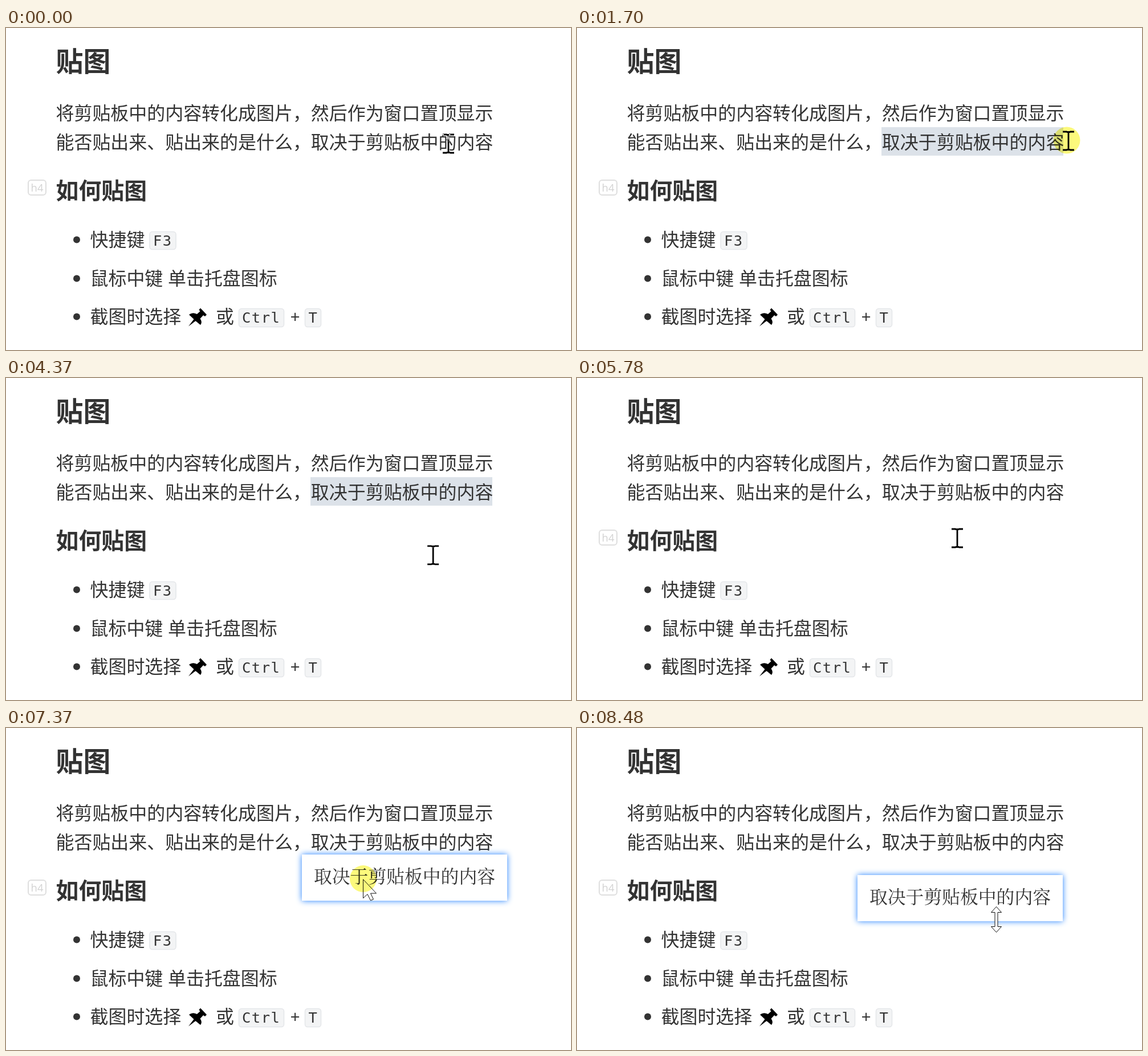
An HTML page for the animation above (8.55 s loop, 991 px wide and 565 px high).

```html
<!DOCTYPE html>
<html lang="zh-CN">
<head>
<meta charset="utf-8">
<style>
html, body { margin: 0; width: 100%; height: 100%; overflow: hidden; background: #fff; }
svg { display: block; width: 991px; height: 565px; }
text { font-family: "Noto Sans CJK SC", "Noto Sans CJK", sans-serif; font-size: 31.96px; fill: #333; white-space: pre; }
.code { font-family: "DejaVu Sans Mono", monospace; font-size: 25.5px; letter-spacing: 1.5px; }
.key { fill: #f3f4f5; stroke: #e4e6e9; stroke-width: 1.5; }
.menu text { font-size: 24px; }
.menu .latin { font-family: "Open Sans", sans-serif; }
.menu .btn { fill: #fbfbfb; stroke: #e3e4e6; stroke-width: 1.5; }
.menu .slab { font-family: "Liberation Mono", monospace; font-size: 27px; text-anchor: middle; }
.panel { fill: #fff; filter: drop-shadow(0 3px 15px rgba(0,0,0,.2)); }
.glow { fill: #fff; filter: drop-shadow(0 0 5.5px #2080ff); }
.note { font-family: "Noto Serif CJK SC", "Noto Serif CJK", "Noto Sans CJK SC", serif; font-weight: 300; font-size: 31.8px; }
.press { fill: #fcf97c; mix-blend-mode: multiply; }
.beam { fill: none; stroke: #fff; stroke-width: 2.8; mix-blend-mode: difference; }
.pointer { fill: #fff; stroke: #111; stroke-width: 1; }
</style>
</head>
<body>
<svg viewBox="0 0 991 565">
  <rect width="991" height="565" fill="#fff"/>
  <rect id="selection" x="534" y="174" height="50" fill="#dce2e9"/>

  <text x="87.5" y="75.5" style="font-size:47.9px;font-weight:700">贴图</text>
  <text x="87.5" y="161">将剪贴板中的内容转化成图片，然后作为窗口置顶显示</text>
  <text x="87.5" y="212">能否贴出来、贴出来的是什么，取决于剪贴板中的内容</text>

  <g id="badge">
    <rect x="39" y="267" width="31" height="26" rx="5" fill="none" stroke="#dedede" stroke-width="2"/>
    <text x="54.5" y="287" text-anchor="middle" style="font:18.5px 'Open Sans',sans-serif;fill:#d2d2d2">h4</text>
  </g>
  <text x="87.5" y="300" style="font-size:39.9px;font-weight:700">如何贴图</text>
  <rect id="caret" x="246" y="257" width="2" height="53" fill="#333"/>

  <g fill="#333">
    <circle cx="124" cy="371.5" r="6"/>
    <circle cx="124" cy="439.5" r="6"/>
    <circle cx="124" cy="506.5" r="6"/>
  </g>
  <text x="147.5" y="383">快捷键</text>
  <rect class="key" x="252" y="357.5" width="46" height="31" rx="4.5"/>
  <text class="code" x="258" y="381.5">F3</text>
  <text x="147.5" y="451">鼠标中键</text>
  <text x="284" y="451">单击托盘图标</text>
  <text x="147.5" y="518">截图时选择</text>
  <path d="M320 523.5L329.500 511L321 503Q327 498 335 502L340.500 497L338.500 494.500L341 491.500L352 503L349 506L346 504L340.500 510Q345 516 341 521L332.500 514Z" fill="#000"/>
  <text x="368" y="518">或</text>
  <rect class="key" x="408.500" y="492.500" width="79" height="32" rx="4.500"/>
  <text class="code" x="414" y="516.5">Ctrl</text>
  <text x="507" y="516.5" text-anchor="middle" style="font:30px 'Open Sans',sans-serif">+</text>
  <rect class="key" x="524.500" y="492.500" width="28" height="32" rx="4.500"/>
  <text class="code" x="530.5" y="516.5">T</text>

  <g id="menu" class="menu">
    <rect class="panel" x="782.500" y="171.500" width="420" height="700" rx="5"/>
    <rect id="hover" x="783" width="420" height="56" fill="#efefef"/>
    <text x="831" y="219.5">使用</text>
    <text class="latin" x="886" y="220">Dolveo</text>
    <text x="968.500" y="219.5">搜索</text>
    <path d="M783 244.500H991M783 488.500H991" stroke="#ebebeb" stroke-width="1.500"/>
    <text x="831" y="293.5">剪切</text>
    <text x="831" y="350">复制</text>
    <text x="831" y="406">粘贴</text>
    <text x="831" y="462">复制</text>
    <text class="latin" x="886.500" y="462">/</text>
    <text x="903" y="462">粘贴为</text>
    <text class="latin" x="974.500" y="462">...</text>
    <rect class="btn" x="824.500" y="502.500" width="86" height="43" rx="4"/>
    <rect class="btn" x="919.500" y="502.500" width="86" height="43" rx="4"/>
    <rect class="btn" x="824.500" y="555.500" width="86" height="43" rx="4"/>
    <rect class="btn" x="919.500" y="555.500" width="86" height="43" rx="4"/>
    <text class="slab" x="867.500" y="532">B</text>
    <text class="slab" x="961" y="532" font-style="italic">I</text>
    <path d="M947 564H950M956 564H975" stroke="#555" stroke-width="1.500"/>
  </g>

  <g id="pinned">
    <rect class="glow" width="360" height="81"/>
    <text class="note" x="21" y="50">取决于剪贴板中的内容</text>
  </g>

  <path id="beam" class="beam" d="M-10 -16H-2.500M2.500 -16H10M-10 16H-2.500M2.500 16H10M-3 -15.500H3M-3 15.500H3M0 -14V14"/>
  <path id="arrow" class="pointer" d="M0 0V33L7.500 26L13 37L18 35L13 24.500H23Z"/>
  <path id="resize" class="pointer" d="M0 -22.500L9 -12.500H2.500V12.500H9L0 22.500L-9 12.500H-2.500V-12.500H-9Z"/>
  <circle id="press" class="press" r="23.500"/>
</svg>
<script>
const LOOP = 8550;
const ui = {};
for (const id of ["selection", "badge", "caret", "menu", "hover", "pinned", "beam", "press", "arrow", "resize"]) {
  ui[id] = document.getElementById(id);
}

// Cursor path: time, x, y. Equal neighbours are rests.
const path = [
  [0, 776, 203], [120, 776, 203],
  [930, 539, 198], [1100, 539, 198],
  [1400, 700, 194], [1680, 862, 198], [1960, 862, 198],
  [2230, 787, 203], [2840, 787, 203],
  [3500, 843, 335], [4180, 843, 335],
  [4370, 749.5, 311], [4680, 667, 281], [5780, 667, 281],
  [6540, 982, 532], [6650, 982, 532],
  [6820, 970, 523], [7370, 627, 266], [7510, 607, 250],
  [7930, 599, 302], [8090, 599, 302],
  [8450, 735.5, 336], [LOOP, 735.5, 336]
];

function slope(i, axis) {
  const a = path[i - 1], b = path[i], c = path[i + 1];
  if (!a || !c) return 0;
  const d1 = b[axis] - a[axis], d2 = c[axis] - b[axis];
  return d1 * d2 <= 0 ? 0 : (d1 + d2) / (c[0] - a[0]);
}

function cursorAt(t) {
  let i = 0;
  while (i < path.length - 2 && t >= path[i + 1][0]) i++;
  const a = path[i], b = path[i + 1], span = b[0] - a[0];
  const u = (t - a[0]) / span, v = 1 - u;
  return [1, 2].map(k =>
    a[k] * v * v * (1 + 2 * u) + b[k] * u * u * (1 + 2 * v) +
    span * u * v * (v * slope(i, k) - u * slope(i + 1, k)));
}

const within = (t, ...spans) => spans.some(([a, b]) => t >= a && t < b);
const clamp = (v, lo, hi) => Math.min(hi, Math.max(lo, v));
const show = (node, on) => node.style.display = on ? "" : "none";
const move = (node, x, y) => node.setAttribute("transform", `translate(${x.toFixed(2)} ${y.toFixed(2)})`);

function selectedChars(t, x) {
  if (!within(t, [1100, 4720])) return 0;
  return t > 1680 ? 10 : clamp(Math.round((x - 534) / 31.9), 0, 10);
}

function hoverRow(y) {
  if (y < 240) return 180;
  return y < 257 ? null : 257 + 56.4 * Math.floor((y - 257) / 56.4);
}

function draw(t) {
  const [x, y] = cursorAt(t);

  ui.selection.setAttribute("width", selectedChars(t, x) * 31.9);
  show(ui.badge, !within(t, [2010, 5000]));
  show(ui.caret, within(t, [190, 720], [4720, 5250], [5800, 6310]));

  const menuOn = within(t, [2250, 4000]);
  show(ui.menu, menuOn);
  ui.menu.style.opacity = clamp((t - 2220) / 150, 0, 1);
  const row = hoverRow(y);
  show(ui.hover, row !== null);
  if (row !== null) ui.hover.setAttribute("y", row);

  // The pinned note follows the cursor only while dragged.
  const pinOn = t >= 5800;
  const grip = cursorAt(clamp(t, 6650, 8080));
  const px = Math.round(grip[0] - 107), py = Math.round(grip[1] - 44);
  show(ui.pinned, pinOn);
  move(ui.pinned, px, py);

  const overPin = pinOn && x > px && x < px + 360 && y > py && y < py + 84;
  const onEdge = overPin && y > py + 74;
  const arrowOn = overPin && !onEdge || menuOn && t > 2920;
  const beamOn = !arrowOn && !onEdge;
  show(ui.resize, onEdge);
  show(ui.arrow, arrowOn);
  show(ui.beam, beamOn);
  for (const node of [ui.resize, ui.arrow, ui.beam]) move(node, x, y);

  show(ui.press, within(t, [1080, 1900], [3940, 4000], [4670, 4980], [6660, 8120]));
  move(ui.press, beamOn ? x - 3 : x, y - 1);
}

const start = performance.now();
function tick() {
  draw((performance.now() - start) % LOOP);
  requestAnimationFrame(tick);
}
tick();
</script>
</body>
</html>
```
